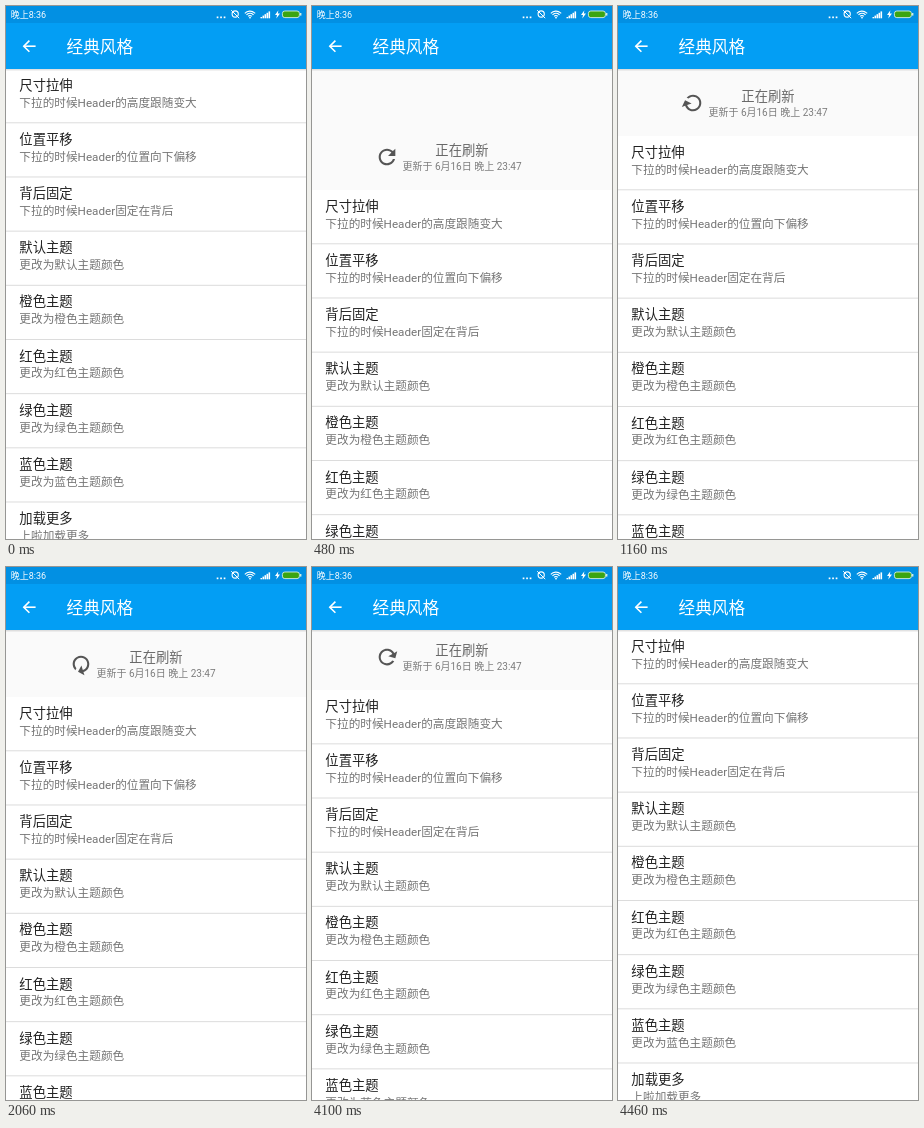
An HTML page with a canvas that plays this animation: 300x533 px, repeating every 4.48 s.

```html
<!DOCTYPE html>
<html lang="zh-CN">
<head>
<meta charset="utf-8">
<style>
html, body { margin: 0; width: 100%; height: 100%; overflow: hidden; background: #fff; }
canvas { display: block; width: 300px; height: 533px; }
</style>
</head>
<body>
<canvas id="stage"></canvas>
<script>
const W = 300, H = 533, LOOP = 4480, STEP = 20;
const BAR_BOTTOM = 63, ROW = 54.17, HEADER = 67;
const RELEASE = 480, THRESHOLD_TIME = 222, FINISH = 4084;
const SETTLE = 250, COLLAPSE = 300, TURN = 1190, FLIP = 300;
const FONT = 'Roboto, "Noto Sans CJK SC", "Noto Sans CJK", sans-serif';

const ROWS = [
  ['尺寸拉伸', '下拉的时候Header的高度跟随变大'],
  ['位置平移', '下拉的时候Header的位置向下偏移'],
  ['背后固定', '下拉的时候Header固定在背后'],
  ['默认主题', '更改为默认主题颜色'],
  ['橙色主题', '更改为橙色主题颜色'],
  ['红色主题', '更改为红色主题颜色'],
  ['绿色主题', '更改为绿色主题颜色'],
  ['蓝色主题', '更改为蓝色主题颜色'],
  ['加载更多', '上啦加载更多']
];

// Finger drag: time, distance
const DRAG = [[0, 0], [120, 26], [222, 67], [280, 88.3], [390, 115], [RELEASE, 121]];

const canvas = document.getElementById('stage');
const ctx = canvas.getContext('2d');
const ratio = window.devicePixelRatio || 1;
canvas.width = W * ratio;
canvas.height = H * ratio;

const refreshIcon = new Path2D('M17.65 6.35C16.2 4.9 14.21 4 12 4c-4.42 0-7.99 3.58-7.99 8s3.57 8 7.99 8c3.73 0 6.84-2.55 7.73-6h-2.08c-.82 2.33-3.04 4-5.65 4-3.31 0-6-2.69-6-6s2.69-6 6-6c1.66 0 3.14.69 4.22 1.78L13 11h7V4z');
const arrowIcon = new Path2D('M20 12l-1.41-1.41L13 16.17V4h-2v12.17l-5.58-5.59L4 12l8 8z');

const clamp = x => Math.max(0, Math.min(1, x));
const easeOut = x => 1 - (1 - clamp(x)) ** 2;
const easeInOut = x => (1 - Math.cos(Math.PI * clamp(x))) / 2;

function dragAt(t) {
  let i = 0;
  while (i < DRAG.length - 2 && t > DRAG[i + 1][0]) i++;
  const slope = k => {
    if (k === 0 || k === DRAG.length - 1) return 0;
    const [a, b] = [DRAG[k - 1], DRAG[k + 1]];
    return (b[1] - a[1]) / (b[0] - a[0]);
  };
  const [t0, y0] = DRAG[i], [t1, y1] = DRAG[i + 1];
  const d = t1 - t0, u = (t - t0) / d, v = 1 - u;
  return y0 * v * v * (1 + 2 * u) + y1 * u * u * (3 - 2 * u)
    + d * u * v * (slope(i) * v - slope(i + 1) * u);
}

function offsetAt(t) {
  if (t < RELEASE) return dragAt(t);
  if (t < FINISH) {
    const peak = DRAG[DRAG.length - 1][1];
    return peak + (HEADER - peak) * easeOut((t - RELEASE) / SETTLE);
  }
  return HEADER * (1 - easeOut((t - FINISH) / COLLAPSE));
}

function rect(x, y, w, h, color) {
  ctx.fillStyle = color;
  ctx.fillRect(x, y, w, h);
}

// y is the middle of the line
function text(str, x, y, size, color, align = 'left') {
  ctx.font = `${size}px ${FONT}`;
  ctx.textAlign = align;
  ctx.fillStyle = color;
  ctx.fillText(str, x, y + size * 0.38);
}

function line(points, width, color = '#fff') {
  ctx.beginPath();
  points.forEach(([x, y], i) => i ? ctx.lineTo(x, y) : ctx.moveTo(x, y));
  ctx.lineWidth = width;
  ctx.strokeStyle = color;
  ctx.stroke();
}

function polygon(points, color = '#fff') {
  ctx.beginPath();
  points.forEach(([x, y]) => ctx.lineTo(x, y));
  ctx.fillStyle = color;
  ctx.fill();
}

function icon(path, x, y, angle) {
  ctx.save();
  ctx.translate(x, y);
  ctx.rotate(angle);
  ctx.scale(1.042, 1.042);
  ctx.translate(-12, -12);
  ctx.fillStyle = '#555';
  ctx.fill(path);
  ctx.restore();
}

function drawHeader(t, offset) {
  rect(0, BAR_BOTTOM, W, offset, '#fafafa');
  const refreshing = t >= RELEASE;
  const label = refreshing ? '正在刷新' : t >= THRESHOLD_TIME ? '释放立即刷新' : '下拉可以刷新';
  text(label, 150, offset + 23, 13.33, '#666', 'center');
  text('更新于 6月16日 晚上 23:47', 150, offset + 38.8, 10, '#7c7c7c', 'center');
  if (refreshing) icon(refreshIcon, 75, offset + 30, (t - RELEASE) / TURN * 2 * Math.PI);
  else icon(arrowIcon, 75, offset + 30, Math.PI * easeInOut((t - THRESHOLD_TIME) / FLIP));
}

function drawList(offset) {
  rect(0, BAR_BOTTOM + offset, W, H, '#fff');
  ROWS.forEach(([title, detail], i) => {
    const y = offset + i * ROW;
    text(title, 13.33, y + 78.7, 13.33, '#212121');
    text(detail, 13.33, y + 96.1, 11.67, '#757575');
    rect(0, y + 116.3, W, 1, '#dcdcdc');
  });
}

function drawStatus() {
  rect(0, 0, W, 17, '#0290e3');
  text('晚上8:36', 4.8, 8.5, 9, '#fff');
  for (const x of [211.5, 215, 218.5]) rect(x - 0.8, 10.5, 1.7, 1.7, '#fff');

  // muted bell
  ctx.beginPath();
  ctx.arc(229.2, 8, 3.1, 0, Math.PI * 2);
  ctx.lineWidth = 1.1;
  ctx.strokeStyle = '#fff';
  ctx.stroke();
  line([[225.2, 4.2], [233.2, 12.2]], 1);

  // wifi
  for (const r of [2.5, 4.7, 6.9]) {
    ctx.beginPath();
    ctx.arc(244, 12, r, -Math.PI * 0.77, -Math.PI * 0.23);
    ctx.lineWidth = 1.1;
    ctx.stroke();
  }
  rect(243.2, 10.8, 1.6, 1.6, '#fff');

  // signal and charging
  for (let i = 0; i < 5; i++) rect(254.5 + i * 2, 11 - i * 1.4, 1.6, 1.3 + i * 1.4, '#fff');
  polygon([[272.4, 4.2], [269, 9], [271, 9], [270.3, 12.6], [274, 7.6], [271.8, 7.6]]);

  // battery
  ctx.beginPath();
  ctx.roundRect(276.4, 5, 17, 6.6, 2.4);
  ctx.fillStyle = '#3ba512';
  ctx.fill();
  ctx.lineWidth = 0.9;
  ctx.strokeStyle = '#d4efe0';
  ctx.stroke();
  rect(294, 7, 1.4, 2.6, '#d4efe0');
}

function drawToolbar() {
  const shadow = ctx.createLinearGradient(0, BAR_BOTTOM, 0, BAR_BOTTOM + 2.5);
  shadow.addColorStop(0, 'rgba(0,0,0,.14)');
  shadow.addColorStop(1, 'rgba(0,0,0,0)');
  rect(0, BAR_BOTTOM, W, 2.5, shadow);
  rect(0, 16, W, BAR_BOTTOM - 16, '#039ef4');
  line([[17.8, 40.2], [29.6, 40.2]], 1.6);
  line([[23.4, 34.6], [17.8, 40.2], [23.4, 45.8]], 1.6);
  text('经典风格', 60.5, 40.3, 16.67, '#fff');
  drawStatus();
}

function draw(t) {
  const offset = offsetAt(t);
  ctx.setTransform(ratio, 0, 0, ratio, 0, 0);
  rect(0, 0, W, H, '#fff');
  drawHeader(t, offset);
  drawList(offset);
  drawToolbar();
}

const start = performance.now();
function frame() {
  const elapsed = Math.max(0, performance.now() - start) % LOOP;
  draw(Math.floor(elapsed / STEP) * STEP);
  requestAnimationFrame(frame);
}
frame();
</script>
</body>
</html>
```
